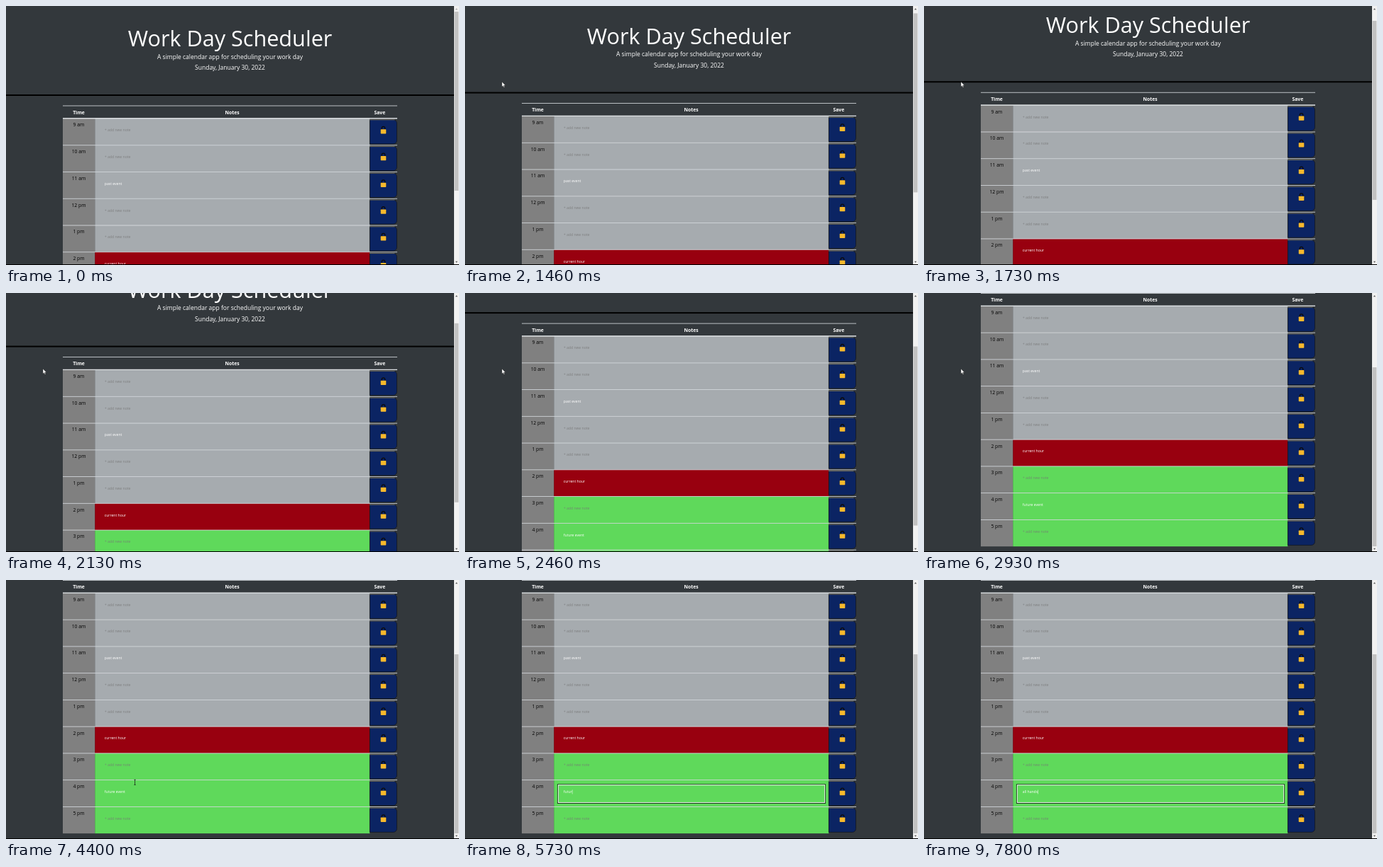
These frames come from a looping animation (638 by 366 pixels, 8000 ms). An HTML page:

```html
<!DOCTYPE html>
<html lang="en">
<head>
<meta charset="utf-8">
<title>Work Day Scheduler</title>
<style>
  html, body { margin: 0; width: 100%; height: 100%; overflow: hidden; background: #33383c; }
  svg { display: block; }
  text { font-family: "Open Sans", sans-serif; font-size: 6.8px; fill: #fff; white-space: pre; }
  .mid { text-anchor: middle; }
  .title { font-size: 30.6px; }
  .lead { font-size: 8.5px; }
  .head { font-weight: 700; }
  .hour { fill: #000; }
  .note { font-size: 5.1px; }
  .empty { fill: #757575; fill-opacity: .8; }
</style>
</head>
<body>
<svg width="638" height="366" viewBox="0 0 638 366">
  <defs>
    <g id="save">
      <path d="M512.4 1.7H545.5a5 5 0 0 1 5 5V31a5 5 0 0 1-5 5H512.4z" fill="#0b2463" stroke="#15181f" stroke-width=".8"/>
      <path d="M512 1.8H547.5" stroke="#8b8672" stroke-width=".8"/>
      <path d="M529.2 16V13.7a2.3 2.3 0 0 1 4.6 0V16" fill="none" stroke="#0c0c0e" stroke-width="1.3"/>
      <rect x="527.7" y="15.2" width="7.6" height="6.3" rx=".7" fill="#f8b92c"/>
    </g>
  </defs>
  <g id="page">
    <text class="mid title" x="315.5" y="57">Work Day Scheduler</text>
    <text class="mid lead" x="315.5" y="74.8">A simple calendar app for scheduling your work day</text>
    <text class="mid lead" x="315.5" y="90">Sunday, January 30, 2022</text>
    <rect y="125" width="631" height="2"/>
    <rect x="80" y="140.6" width="471" height=".8" fill="#dee2e6"/>
    <text class="mid head" x="102.5" y="152.5">Time</text>
    <text class="mid head" x="318.5" y="152.5">Notes</text>
    <text class="mid head" x="526.3" y="152.5">Save</text>
    <g id="rows"></g>
    <rect x="80" y="158.2" width="471" height="1" fill="#e8ebed"/>
    <g id="focus" fill="none" stroke-width=".9">
      <rect x="130.4" y="429.5" width="377.2" height="26.6" stroke="#101010"/>
      <rect x="131.3" y="430.4" width="375.4" height="24.8" stroke="#fff"/>
    </g>
    <rect id="caret" y="437.1" width=".5" height="6" fill="#fff"/>
  </g>
  <path id="arrow" d="M0 0V7.2L1.7 5.7L2.8 8.2L3.9 7.7L2.8 5.3H5z" fill="#fff" stroke="#111" stroke-width=".4"/>
  <path id="beam" d="M-1.2-3.6H1.2M0-3.6V3.6M-1.2 3.6H1.2" stroke="#111" stroke-width=".7"/>
  <rect x="631" width="7" height="366" fill="#f1f1f1"/>
  <rect id="thumb" x="631.7" width="5.6" height="253" fill="#c1c1c1"/>
  <path id="up" d="M632.9 5.2h3.2l-1.6-2z"/>
  <path d="M632.9 360.8h3.2l-1.6 2z" fill="#505050"/>
  <rect y="365" width="638" height="1"/>
</svg>
<script>
const $ = id => document.getElementById(id);
const LOOP = 8000, TOP = 159, PITCH = 37.75, NOTE_X = 138.8, EDITED = 7;
const PLACEHOLDER = '+ add new note';
const hours = ['9 am', '10 am', '11 am', '12 pm', '1 pm', '2 pm', '3 pm', '4 pm', '5 pm'];
const notes = { 2: 'past event', 5: 'current hour', 7: 'future event' };
const NEW_NOTE = 'all hands';
const keyTimes = [6400, 6600, 6730, 7000, 7060, 7200, 7330, 7530, 7660];
const scrollPath = [[1400, 0], [1730, 18.7], [2130, 50.3], [2460, 97.8], [2800, 140.6]];
const cursorPath = [[660, 150, 190], [860, 52, 107], [3340, 52, 107], [3660, 150, 240],
                    [3800, 150, 240], [4600, 192, 301]];
const CLICK = 4660, ERASE = 5530;

$('rows').innerHTML = hours.map((hour, i) => {
  const color = i < 5 ? '#a6abaf' : i === 5 ? '#98000f' : '#5fd95b';
  return `<g transform="translate(0 ${TOP + i * PITCH})">
    <rect x="80" width="45.3" height="${PITCH}" fill="#808080"/>
    <rect x="125.3" width="387" height="${PITCH}" fill="${color}"/>
    <use href="#save"/>
    <rect x="80" y="-.4" width="471" height=".8" fill="#dee2e6"/>
    <text class="mid hour" x="102.5" y="11.4">${hour}</text>
    <text class="note ${notes[i] ? '' : 'empty'}" x="${NOTE_X}" y="18.3">${notes[i] || PLACEHOLDER}</text>
  </g>`;
}).join('');
const editedNote = document.querySelectorAll('.note')[EDITED];

// Linear interpolation along [time, ...values] points, clamped at both ends.
function along(path, t) {
  if (t <= path[0][0]) return path[0].slice(1);
  for (let i = 1; i < path.length; i++) {
    const [a, b] = [path[i - 1], path[i]];
    if (t < b[0]) return a.slice(1).map((v, k) => v + (b[k + 1] - v) * (t - a[0]) / (b[0] - a[0]));
  }
  return path[path.length - 1].slice(1);
}

function noteAt(t) {
  if (t < ERASE) return notes[EDITED];
  const typed = keyTimes.filter(k => k <= t).length;
  if (typed) return NEW_NOTE.slice(0, typed);
  return notes[EDITED].slice(0, Math.max(0, 11 - 2 * Math.floor((t - ERASE) / 66)));
}

const show = (el, on) => el.setAttribute('visibility', on ? 'visible' : 'hidden');

function draw(t) {
  const [scroll] = along(scrollPath, t);
  $('page').setAttribute('transform', `translate(0 ${-scroll})`);
  $('thumb').setAttribute('y', 8 + scroll * .69);
  $('up').setAttribute('fill', scroll ? '#505050' : '#a3a3a3');

  const [x, y] = along(cursorPath, t);
  const visible = t >= 660 && t < ERASE, overNote = x > 130;
  for (const id of ['arrow', 'beam']) {
    $(id).setAttribute('transform', `translate(${x} ${y})`);
    show($(id), visible && overNote === (id === 'beam'));
  }

  const note = noteAt(t);
  editedNote.textContent = note || PLACEHOLDER;
  editedNote.classList.toggle('empty', !note);
  const lastInput = [CLICK, ERASE, 5926, ...keyTimes].filter(k => k <= t).pop();
  const erasing = t >= ERASE && t < 5926;
  show($('focus'), t >= CLICK);
  show($('caret'), t >= CLICK && (erasing || (t - lastInput) % 1000 < 500));
  $('caret').setAttribute('x', NOTE_X + .2 + (note ? editedNote.getComputedTextLength() : 0));
}

function tick() {
  draw(performance.now() % LOOP);
  requestAnimationFrame(tick);
}
tick();
</script>
</body>
</html>
```
